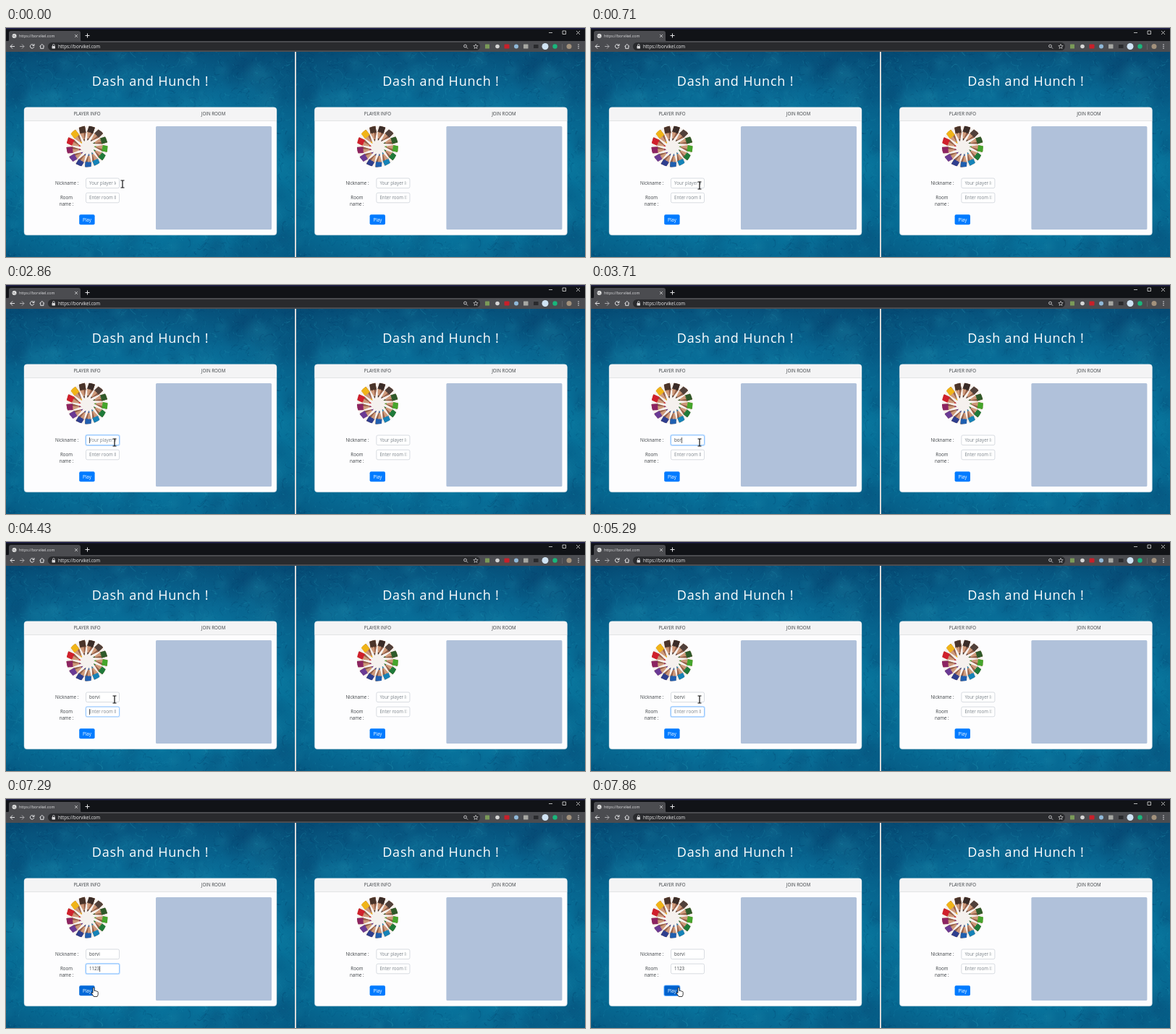
An HTML page with a canvas that plays this animation: 800 px wide and 317 px high, repeating every 8000 ms.

```html
<!DOCTYPE html>
<html lang="en">
<head>
<meta charset="utf-8">
<title>Drawing game lobby</title>
<style>
  html, body { margin: 0; width: 100%; height: 100%; overflow: hidden; background: #07648f; }
  canvas, #stage { position: absolute; left: 0; top: 0; width: 800px; height: 317px; }
  text { font-family: "Open Sans", "Noto Sans", sans-serif; font-size: 6.2px; fill: #3c4044; white-space: pre; }
  .mid { text-anchor: middle; }
  .title { font-size: 18px; letter-spacing: .8px; fill: #fff; }
  .hint { fill: #7b838a; }
</style>
</head>
<body>
<canvas id="wall" width="800" height="317"></canvas>
<svg id="stage" viewBox="0 0 800 317"></svg>
<script>
const $ = id => document.getElementById(id);
const clamp = (v, lo, hi) => Math.max(lo, Math.min(hi, v));
const NICK = 'borvi', ROOM = '1123', URL_TEXT = 'https://borvikel.com';

// Scratched, mottled blue wall, the same in both windows
function paintWall() {
  const tile = document.createElement('canvas');
  tile.width = 399; tile.height = 284;
  const c = tile.getContext('2d');
  let seed = 7;
  const rnd = () => (seed = seed * 16807 % 2147483647) / 2147483647;
  const fill = (g, stops) => {
    stops.forEach(([at, col]) => g.addColorStop(at, col));
    c.fillStyle = g;
    c.fillRect(0, 0, 399, 284);
  };
  const tone = alpha => rnd() < .5 ? `rgba(45,165,190,${rnd() * alpha})` : `rgba(0,45,90,${rnd() * alpha})`;
  fill(c.createLinearGradient(0, 0, 0, 284),
    [[0, '#07557f'], [.2, '#086a95'], [.55, '#087da5'], [.85, '#0777a0'], [1, '#076a94']]);
  fill(c.createRadialGradient(200, 160, 130, 200, 160, 270),
    [[0, 'rgba(0,45,85,0)'], [1, 'rgba(0,45,85,.35)']]);
  for (let i = 0; i < 260; i++) {
    const x = rnd() * 399, y = rnd() * 284, r = 6 + rnd() * 22, col = tone(.16);
    fill(c.createRadialGradient(x, y, 0, x, y, r), [[0, col], [1, col.replace(/[^,]+\)$/, '0)')]]);
  }
  for (let i = 0; i < 3500; i++) {
    const x = rnd() * 399, y = rnd() * 284, a = rnd() * 6.3, len = 1 + rnd() * rnd() * 16;
    c.strokeStyle = tone(.26);
    c.lineWidth = .4 + rnd() * .8;
    c.beginPath();
    c.moveTo(x, y);
    c.quadraticCurveTo(x + len * Math.cos(a), y + len * Math.sin(a),
      x + len * Math.cos(a + .5), y + len * Math.sin(a + .5));
    c.stroke();
  }
  const wall = $('wall').getContext('2d');
  wall.drawImage(tile, 0, 33);
  wall.drawImage(tile, 401, 33);
  wall.fillStyle = '#d9d9d9';
  wall.fillRect(399, 33, 2, 284);
}

const rect = (x, y, w, h, fill, rx = 0, more = '') =>
  `<rect x="${x}" y="${y}" width="${w}" height="${h}" fill="${fill}" rx="${rx}" ${more}/>`;
const disc = (x, y, r, fill, more = '') => `<circle cx="${x}" cy="${y}" r="${r}" fill="${fill}" ${more}/>`;
const label = (x, y, s, cls = '', style = '') => `<text x="${x}" y="${y}" class="${cls}" style="${style}">${s}</text>`;
const line = (d, col = '#e4e4e6', w = 1) => `<path d="${d}" fill="none" stroke="${col}" stroke-width="${w}"/>`;

function browser() {
  return rect(0, 0, 800, 19, '#111317') + rect(0, 0, 800, 1.5, '#22224e') +
    `<path d="M1 19q3 0 3-3v-9q0-3 3-3h93q3 0 3 3v9q0 3 3 3z" fill="#4b4c50"/>` +
    rect(0, 18, 800, 15, '#4b4c50') +
    disc(11.5, 11, 3, '#e6e6e6') + line('M9 10.5l2 1 1-2M12 13l1-1.5', '#77797d', .8) +
    label(18, 13, URL_TEXT, '', 'font-size:5.25px;fill:#e0e0e2') +
    line('M95 9l4 4m0-4l-4 4', '#d0d0d2', .8) + line('M109.5 10.5h6m-3-3v6') +
    line('M750 6.5h5', '#ddd', .8) + line('M769 4h4.5v4.5h-4.5z', '#ddd', .8) + line('M788 4l5 5m0-5l-5 5', '#ddd', .8) +
    line('M12 25.5h-6m3-3l-3 3 3 3') + line('M19 25.5h6m-3-3l3 3-3 3', '#a8a8ab') +
    line('M38 23.5a2.7 2.7 0 1 0 .7 2.5M39 22v2.5h-2.5') +
    line('M46.5 25.5l3.3-3 3.3 3M47.7 25v3.3h4.2v-3.3') +
    rect(58, 20, 597, 11, '#292a2d', 5.5) +
    rect(63.5, 25, 4.5, 3.5, '#d8d8da', .4) + line('M64.5 25v-1.2a1.3 1.3 0 0 1 2.6 0v1.2', '#d8d8da', .8) +
    label(72, 28, URL_TEXT, '', 'fill:#f1f1f2') +
    disc(634.5, 25, 1.9, 'none', 'stroke="#d0d0d2" stroke-width=".9"') + line('M636 26.5l2 2', '#d0d0d2', .9) +
    line('M649 22.3l.9 2.2 2.3.1-1.8 1.5.6 2.3-2-1.3-2 1.3.6-2.3-1.8-1.5 2.3-.1z', '#d0d0d2', .7) +
    rect(662, 22.5, 6, 6, '#7a9a58', .5) + disc(679, 25.5, 2.8, '#d5d5d5') +
    rect(688.5, 22.5, 7, 6, '#c8202a', 1) + disc(705, 25.5, 3, '#8fb8d8') +
    rect(715, 22.5, 6.5, 6, '#a6a7a2', .5) + rect(729, 23, 6.5, 5, '#292a2d', .5) +
    disc(745, 25.5, 4.5, '#cfe3f3') + disc(758.5, 25.5, 3.2, '#18b67b') +
    rect(768, 22, .6, 8, '#707175') + disc(778, 25.5, 3.5, '#a2917c') +
    [23, 25.5, 28].map(y => disc(791, y, .75, '#e4e4e6')).join('');
}

// Pinwheel of coloured pencils pointing inward, clockwise from the top
const PENCILS = ['#3a2c28', '#50403a', '#2f5a2a', '#45a52c', '#1f7a3a', '#1583b8', '#1f5fb0',
  '#2f3f8f', '#6a3a94', '#8c2462', '#d0202c', '#f0b418', '#4a342a'];
function pencils() {
  const step = 360 / PENCILS.length;
  const ring = PENCILS.map((col, i) => `<g transform="translate(112.5 165) rotate(${i * step}) translate(0 -9) rotate(18)">
    <path d="M0 0L-4.2-12V-28H4.2V-12z" fill="#cf9a7a"/>
    <path d="M0 0L1.2-12V-28H4.2V-12z" fill="#94604a"/>
    <path d="M-4.2-28v17q1.4-2.5 2.8 0 1.4-2.5 2.8 0 1.4-2.5 2.8 0v-17z" fill="${col}"/>
    <path d="M-1.1-3L0 0 1.1-3z" fill="${col}"/></g>`).join('');
  return `<g clip-path="url(#round)">${disc(112, 164, 28.5, '#f5f1ee')}${ring}</g>`;
}

const field = (id, y, hint) =>
  rect(109.9, y - .6, 47.2, 14.8, 'none', 2.5, `id="${id}Ring" stroke="#007bff" stroke-width="1.4"`) +
  rect(110.5, y, 46, 13.6, '#fff', 2, `id="${id}Box" stroke="#ced4da" stroke-width=".8"`) +
  `<svg x="115" y="${y}" width="37" height="14">
    <text id="${id}Text" y="9.1" class="hint">${hint}</text>
    <rect id="${id}Caret" y="3" width=".7" height="8" fill="#222" visibility="hidden"/></svg>`;

const HINTS = { nick: 'Your player Id', room: 'Enter room ID' };
const lobby = (dx, p) => `<g transform="translate(${dx})">` +
  label(199.5, 79.7, 'Dash and Hunch !', 'mid title') +
  rect(25, 109.7, 349, 177, '#fdfdfe', 4, 'stroke="#b4c8d4" stroke-width=".5"') +
  `<path d="M25.2 128v-14.1q0-4 4-4h340.600q4 0 4 4v14.1z" fill="#f4f4f5"/>` +
  rect(25, 128, 349, .7, '#d9dadc') +
  label(112, 121.2, 'PLAYER INFO', 'mid') + label(286.5, 121.2, 'JOIN ROOM', 'mid') +
  pencils() + rect(207, 136, 160, 143, '#b0c1da', 1.5) +
  label(68, 217, 'Nickname :') + label(83.5, 237.3, 'Room', 'mid') + label(83.5, 246.3, 'name :', 'mid') +
  field(p + 'nick', 208, HINTS.nick) + field(p + 'room', 228.2, HINTS.room) +
  rect(101.2, 258.2, 21.4, 14, '#007bff', 2, `id="${p}play"`) +
  label(112, 267.5, 'Play', 'mid', 'fill:#fff') + '</g>';

const POINTERS = {
  beam: '<path d="M-2.5-5h2q.5 0 .5.5q0-.5.5-.5h2M0-4.5v9M-2.5 5h2q.5 0 .5-.5q0 .5.5.5h2" fill="none" stroke="#111" stroke-width="1.2"/>',
  arrow: '<path d="M0 0v10l2.3-2.2 1.5 3.5 1.6-.7-1.5-3.4h3.2z" fill="#fff" stroke="#111" stroke-width=".7"/>',
  hand: '<path d="M-1 1q0-1.200 1-1.200t1 1.200v3.500q1.500-.8 2 .4q1.200-.5 1.700.5q1.500-.3 1.500 1.200v2.500q0 2-1.200 3.400h-4.800q-1.200-2.500-3.200-4.500q-.5-1.300 1-1.200l1 .8z" fill="#fff" stroke="#111" stroke-width=".8"/>'
};

paintWall();
$('stage').innerHTML = `<clipPath id="round">${disc(112, 164, 28.5, '#000')}</clipPath>` +
  browser() + lobby(0, 'a-') + lobby(401.4, 'b-') + '<g id="pointer"></g>';
document.querySelectorAll('[id$=Ring]').forEach(ring => ring.setAttribute('opacity', 0));

function setField(name, text, glow, caretOn) {
  const out = $(`a-${name}Text`), caret = $(`a-${name}Caret`);
  $(`a-${name}Box`).setAttribute('stroke', glow ? '#80bdff' : '#ced4da');
  $(`a-${name}Ring`).setAttribute('opacity', .25 * glow);
  out.textContent = text || HINTS[name];
  out.setAttribute('class', text ? '' : 'hint');
  caret.setAttribute('x', text ? out.getComputedTextLength() + .2 : 0);
  caret.setAttribute('visibility', caretOn ? 'visible' : 'hidden');
}

function pointerAt(k) {
  const a = clamp(k / 3, 0, 1), b = clamp((k - 47) / 4, 0, 1);
  const x = 161 - 11 * a - 29 * b, y = 216 + 2 * a + 43 * b;
  const kind = b === 1 ? 'hand' : y > 243 ? 'arrow' : 'beam';
  return { x, y, kind };
}

let last = -1;
function draw(now) {
  requestAnimationFrame(draw);
  const k = Math.floor((now % 8000 + 5) * 7 / 1000); // seven steps a second
  if (k === last) return;
  last = k;

  const nickLen = clamp(k - 23, 0, 5), roomLen = clamp(k - 37, 0, 4);
  const onNick = k >= 10 && k < 31, onRoom = k >= 31 && k < 53;
  const lastKey = onNick ? (nickLen ? 23 + nickLen : 10) : (roomLen ? 37 + roomLen : 31);
  const blink = Math.floor((k - lastKey) / 7 / .53) % 2 === 0;
  const glow = (on, start) => on ? (k === start ? .5 : 1) : 0;
  setField('nick', NICK.slice(0, nickLen), glow(onNick, 10), onNick && blink);
  setField('room', ROOM.slice(0, roomLen), glow(onRoom, 31), onRoom && blink);

  const play = $('a-play'), pressed = k >= 53;
  play.setAttribute('fill', pressed ? '#0062cc' : k >= 51 ? '#0069d9' : '#007bff');
  play.setAttribute('stroke', pressed ? 'rgba(0,123,255,.5)' : 'none');
  play.setAttribute('stroke-width', 1.6);

  const p = pointerAt(k);
  $('pointer').setAttribute('transform', `translate(${p.x} ${p.y})`);
  $('pointer').innerHTML = POINTERS[p.kind];
}
requestAnimationFrame(draw);
</script>
</body>
</html>
```
